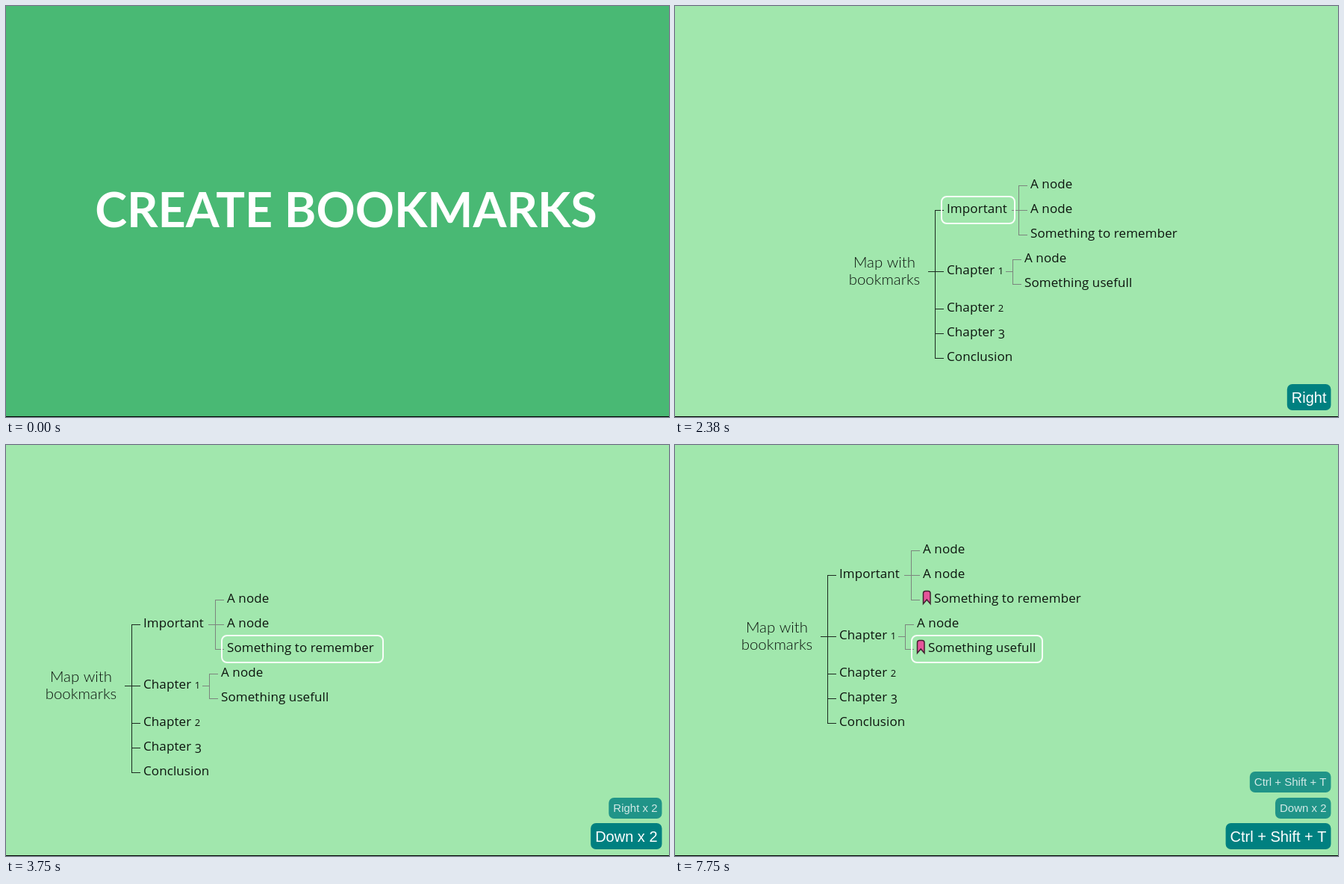
Recreate the animation shown at these times as an HTML page with a canvas. Size 888 px wide and 550 px high, loop 8 s.

```html
<!DOCTYPE html>
<html lang="en">
<head>
<meta charset="utf-8">
<title>Create bookmarks</title>
<style>
  html, body { margin: 0; width: 100%; height: 100%; overflow: hidden; }
  canvas { display: block; }
</style>
</head>
<body>
<canvas id="stage" width="888" height="550"></canvas>
<script>
const ctx = document.getElementById('stage').getContext('2d');
const LOOP = 8000, FRAME = 125;
const INK = '#0c140e', ROOT_FONT = '300 20.4px Lato, sans-serif';

// x: text start, y: connector height, w: text width, mark: time the bookmark appears
const nodes = {
  important: { text: 'Important', x: 480, y: 191, w: 82 },
  first:     { text: 'A node', x: 592, y: 158, w: 56 },
  second:    { text: 'A node', x: 592, y: 191, w: 56 },
  remember:  { text: 'Something to remember', x: 592, y: 224, w: 200, mark: 4750 },
  chapter1:  { text: 'Chapter ', digit: 1, x: 480, y: 273, w: 75 },
  third:     { text: 'A node', x: 584, y: 257, w: 56 },
  useful:    { text: 'Something usefull', x: 584, y: 290, w: 144, mark: 7750 },
  chapter2:  { text: 'Chapter ', digit: 2, x: 480, y: 323, w: 76 },
  chapter3:  { text: 'Chapter ', digit: 3, x: 480, y: 356, w: 77 },
  conclusion:{ text: 'Conclusion', x: 480, y: 389, w: 87 }
};

// Selected node and map offset that centres it
const selections = [
  { at: 0, node: null, x: 0, y: 0 },
  { at: 2124, node: nodes.important, x: -125, y: 82 },
  { at: 2594, node: nodes.first, x: -224, y: 115 },
  { at: 3120, node: nodes.second, x: -224, y: 82 },
  { at: 3459, node: nodes.remember, x: -296, y: 49 },
  { at: 6215, node: nodes.third, x: -216, y: 16 },
  { at: 6470, node: nodes.useful, x: -260, y: -17 }
];

const presses = [
  [2000, 'Right'], [2500, 'Right'], [3000, 'Down'], [3375, 'Down'],
  [4750, 'Ctrl + Shift + T'], [6125, 'Down'], [6375, 'Down'], [7625, 'Ctrl + Shift + T']
];

// Each axis scrolls on its own, slowing with the square root of the distance left
function approach(from, to, ms) {
  let left = Math.abs(to - from);
  for (let i = 0; i < ms && left > 0; i++) left -= (5 + Math.sqrt(left)) / 27;
  return to - Math.sign(to - from) * Math.max(left, 0);
}

function viewAt(t) {
  const view = { x: 0, y: 0, node: null };
  selections.forEach((s, i) => {
    if (t < s.at) return;
    const next = selections[i + 1];
    const ms = Math.min(t, next ? next.at : LOOP) - s.at;
    view.x = approach(view.x, s.x, ms);
    view.y = approach(view.y, s.y, ms);
    view.node = s.node;
  });
  return view;
}

function write(text, x, y, font, color = INK, align = 'left', spacing = 0) {
  ctx.font = font;
  ctx.fillStyle = color;
  ctx.textAlign = align;
  ctx.letterSpacing = spacing + 'px';
  ctx.fillText(text, x, y);
}

function hline(x1, x2, y) { ctx.fillRect(x1, y, x2 - x1, 1); }

function bracket(x, end, ys, stemStart, stemY, color) {
  ctx.fillStyle = color;
  const top = ys[0], bottom = ys[ys.length - 1];
  ctx.fillRect(x, top, 1, bottom - top + 1);
  for (const y of ys) hline(x, end, y);
  hline(stemStart, x, stemY);
}

function outline(x, y, w, h) {
  ctx.strokeStyle = '#f8fdf9';
  ctx.lineWidth = 2;
  ctx.beginPath();
  ctx.roundRect(x, y, w, h, 7);
  ctx.stroke();
}

function ribbon(x, y) {
  ctx.beginPath();
  ctx.moveTo(x, y + 17);
  ctx.lineTo(x, y + 3);
  ctx.quadraticCurveTo(x, y, x + 3, y);
  ctx.lineTo(x + 6.5, y);
  ctx.quadraticCurveTo(x + 9.5, y, x + 9.5, y + 3);
  ctx.lineTo(x + 9.5, y + 17);
  ctx.lineTo(x + 4.75, y + 11.5);
  ctx.closePath();
  ctx.fillStyle = '#e5559b';
  ctx.strokeStyle = '#41222f';
  ctx.lineWidth = 1.5;
  ctx.fill();
  ctx.stroke();
}

function drawNode(n, t, selected) {
  const shift = t >= n.mark ? 15 : 0;
  const base = n.y + 4;
  write(n.text, n.x + shift, base, '17px "Open Sans", sans-serif', INK, 'left', 0.1);
  if (n.digit) {
    // Old-style figures: 1 and 2 are small, 3 hangs below the baseline
    const hangs = n.digit === 3;
    const x = n.x + ctx.measureText(n.text).width;
    write(n.digit, x, base + (hangs ? 3 : 0), `${hangs ? 16 : 13}px "Open Sans", sans-serif`);
  }
  if (shift) ribbon(n.x + 0.5, n.y - 11.5);
  if (selected) outline(n.x - 7, n.y - 18, n.w + shift + 16, 36);
}

function drawMap(t) {
  const view = viewAt(t);
  ctx.save();
  ctx.translate(Math.round(view.x), Math.round(view.y));
  bracket(464, 476, [191, 273, 323, 356, 389], 455, 273, '#1c2a20');
  bracket(576, 588, [158, 191, 224], 567, 191, '#7c857e');
  bracket(568, 580, [257, 290], 559, 273, '#7c857e');
  write('Map with', 396.5, 268, ROOT_FONT, INK, 'center');
  write('bookmarks', 396.5, 291, ROOT_FONT, INK, 'center');
  if (!view.node) outline(335, 237, 125, 73);
  for (const n of Object.values(nodes)) drawNode(n, t, n === view.node);
  ctx.restore();
}

function drawKeys(t) {
  const stack = [];
  for (const [at, key] of presses) {
    if (t < at) break;
    if (stack[0] && stack[0].key === key) stack[0].count++;
    else stack.unshift({ key, count: 1 });
  }
  stack.slice(0, 3).forEach(({ key, count }, i) => {
    const label = count > 1 ? `${key} x ${count}` : key;
    const [top, height, size] = i ? [507 - 35 * i, 28, 15] : [506, 35, 20];
    const font = `${size}px "Liberation Sans", Arial, sans-serif`;
    ctx.font = font;
    ctx.letterSpacing = '0px';
    const width = ctx.measureText(label).width + 12;
    ctx.globalAlpha = i ? 0.8 : 1;
    ctx.fillStyle = '#008080';
    ctx.beginPath();
    ctx.roundRect(878.5 - width, top, width, height, 7);
    ctx.fill();
    write(label, 878.5 - width / 2, top + height / 2 + size * 0.36, font, '#fff', 'center');
    ctx.globalAlpha = 1;
  });
}

function draw(t) {
  const intro = t < 500;
  ctx.fillStyle = intro ? '#49b974' : '#a1e7ad';
  ctx.fillRect(0, 0, 888, 550);
  if (intro) {
    write('CREATE BOOKMARKS', 455.5, 296, 'bold 64.7px Lato, sans-serif', '#fff', 'center');
  } else {
    drawMap(t);
    drawKeys(t);
  }
  ctx.fillStyle = '#000';
  ctx.fillRect(0, 549, 888, 1);
}

function tick() {
  const t = performance.now() % LOOP;
  draw(Math.floor(t / FRAME) * FRAME);
  requestAnimationFrame(tick);
}
tick();
</script>
</body>
</html>
```
